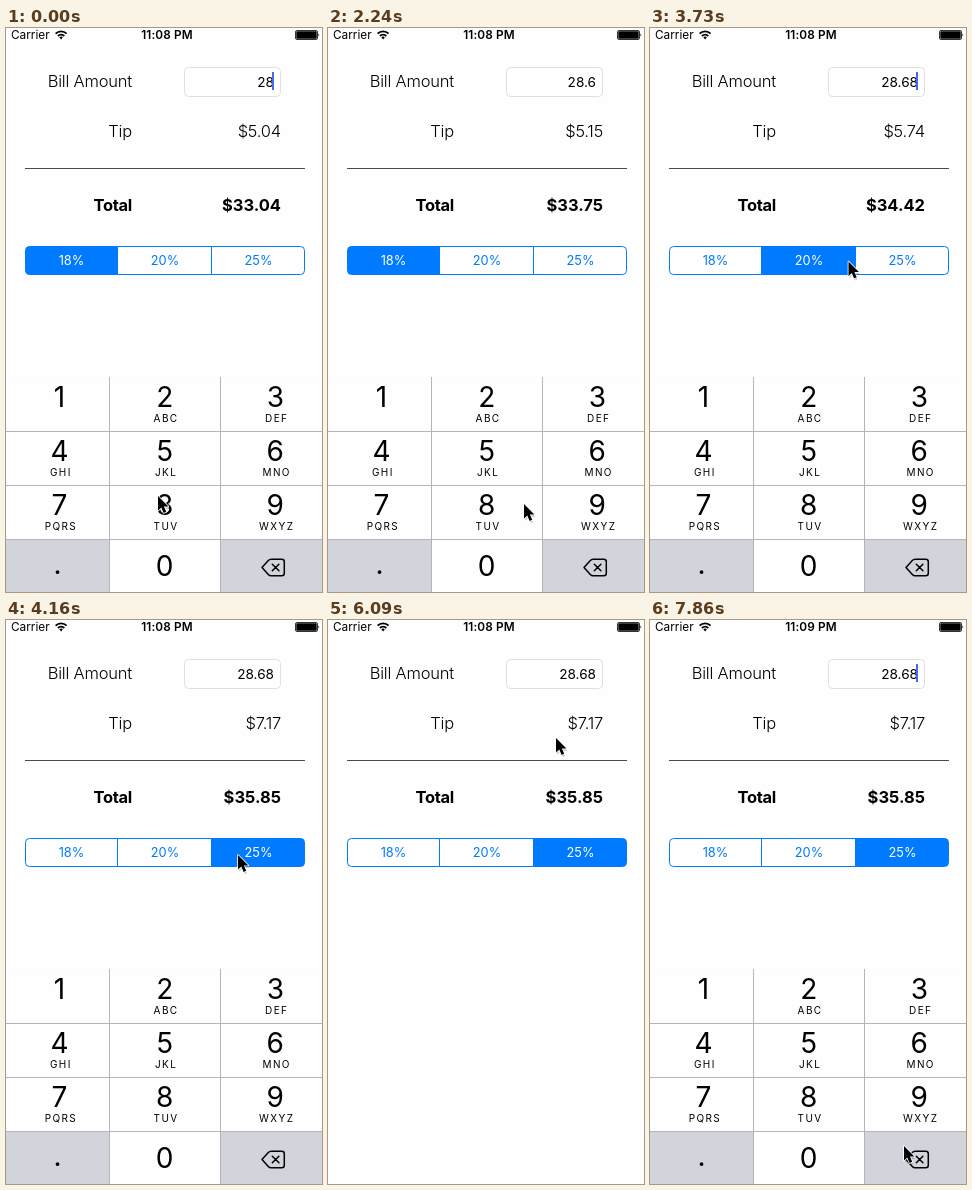
Recreate the animation shown at these times as an HTML page. Size 316x564 px, loop 8 s.

```html
<!DOCTYPE html>
<html lang="en">
<head>
<meta charset="utf-8">
<title>Tip calculator</title>
<style>
  html, body { margin: 0; width: 100%; height: 100%; overflow: hidden; background: #fefefe; }
  svg { display: block; width: 316px; height: 564px; font-family: Inter, Roboto, sans-serif; }
  .light { font-size: 16.5px; font-weight: 300; letter-spacing: -.2px; text-anchor: end; }
  .bold { font-size: 16.5px; font-weight: 700; text-anchor: end; }
  .digit { font-size: 28px; text-anchor: middle; }
  .letters { font-size: 10px; letter-spacing: 1.4px; text-anchor: middle; }
  .seg { font-size: 12.8px; text-anchor: middle; }
</style>
</head>
<body>
<svg id="stage" viewBox="0 0 316 564">
  <rect width="316" height="564" fill="#fefefe"/>

  <text x="5" y="11.3" font-size="11.8">Carrier</text>
  <g fill="none" stroke="#000" stroke-width="1.8">
    <path d="M49.6 5.6a7.8 7.8 0 0 1 11 0M51.9 8a4.6 4.6 0 0 1 6.4 0"/>
    <path d="M53.4 9.4a2.4 2.4 0 0 1 3.4 0L55.1 11.4Z" fill="#000" stroke="none"/>
  </g>
  <text id="clock" x="161" y="11.3" font-size="11.8" font-weight="600" letter-spacing=".15" text-anchor="middle"></text>
  <rect x="289.5" y="2.5" width="22" height="9" rx="1.5" fill="#fefefe" stroke="#000" stroke-width=".8"/>
  <rect x="290.3" y="3.2" width="20.4" height="7.6" rx=".8"/>
  <path d="M312.5 5.2q1.6 1.8 0 3.6Z"/>

  <text class="light" x="126" y="58.5">Bill Amount</text>
  <text class="light" x="126" y="108.5">Tip</text>
  <text class="bold" x="126" y="182.5" letter-spacing="-.3">Total</text>
  <rect x="178.5" y="39.5" width="96" height="29" rx="4" fill="#fff" stroke="#dfdfe1"/>
  <text id="bill" x="268" y="59" font-size="13.6" text-anchor="end"></text>
  <rect id="caret" x="266" y="44" width="2" height="18" fill="#426bf2"/>
  <text id="tip" class="light" x="275" y="108.5"></text>
  <text id="total" class="bold" x="275" y="183.2"></text>
  <path d="M19 140.5H299" stroke="#4c4c4c"/>

  <g id="segments"></g>
  <g id="keyboard"></g>

  <g id="pointer">
    <path d="M.6 1.6V16l3.3-3 2.3 5.3 2.5-1.1-2.2-5.1h4.6Z" fill="#000" opacity=".2" transform="translate(.4 .8)"/>
    <path d="M0 0V14.6L3.3 11.5 5.6 16.9 8.2 15.8 5.9 10.5H10.4Z" stroke="#fff" stroke-width="1.6" paint-order="stroke" stroke-linejoin="round"/>
  </g>
</svg>
<script>
const LOOP = 8000, STEPS = 54;
const BLUE = '#007aff', PAPER = '#fefefe', GREY = '#d1d4db', TINT = '#d4e8ff';
const $ = id => document.getElementById(id);

function add(parent, tag, attrs, text = '') {
  const el = document.createElementNS('http://www.w3.org/2000/svg', tag);
  for (const name in attrs) el.setAttribute(name, attrs[name]);
  el.textContent = text;
  return parent.appendChild(el);
}

// Segmented control
const rates = [18, 20, 25];
const segPaths = [
  'M111.5 218.5H23.5a4 4 0 0 0-4 4V242.5a4 4 0 0 0 4 4H111.5Z',
  'M111.5 218.5H205.5V246.5H111.5Z',
  'M205.5 218.5H294.5a4 4 0 0 1 4 4V242.5a4 4 0 0 1-4 4H205.5Z'
];
const segments = rates.map((rate, i) => ({
  box: add($('segments'), 'path', { d: segPaths[i], stroke: BLUE }),
  label: add($('segments'), 'text', { class: 'seg', x: 65.5 + 93.5 * i, y: 237.3 }, rate + '%')
}));

// Number pad
const colX = [0, 103.5, 214.5, 316], rowY = [348.5, 403.5, 457.5, 511.5, 564];
const midX = [53.5, 158.7, 269.3], baseY = [379, 433, 487, 548];
const faces = ['1', '2', '3', '4', '5', '6', '7', '8', '9', '.', '0', ''];
const letters = ['', 'ABC', 'DEF', 'GHI', 'JKL', 'MNO', 'PQRS', 'TUV', 'WXYZ'];
const pad = $('keyboard');
const keys = faces.map((face, i) => {
  const c = i % 3, r = Math.floor(i / 3);
  const box = add(pad, 'rect', {
    x: colX[c], y: rowY[r], width: colX[c + 1] - colX[c], height: rowY[r + 1] - rowY[r]
  });
  const dot = face === '.';
  add(pad, 'text', { class: 'digit', x: midX[c] - (dot ? 2 : 0), y: baseY[r] - (dot ? 2 : 0) }, face);
  if (letters[i]) add(pad, 'text', { class: 'letters', x: midX[c] + 1.4, y: baseY[r] + 15 }, letters[i]);
  return { face, box, rest: dot || !face ? GREY : PAPER, down: dot ? PAPER : GREY };
});
add(pad, 'path', {
  d: 'M103.5 349V564M214.5 349V564M0 403.5H316M0 457.5H316M0 511.5H316', stroke: '#b4b5b9', fill: 'none'
});
add(pad, 'path', {
  d: 'M256 539.5L262.3 532.6Q263.5 531.3 265.2 531.3H275.8Q278.3 531.3 278.3 533.8V545.2Q278.3 547.7 275.8 547.7H265.2Q263.5 547.7 262.3 546.4ZM266.3 536.2L272.9 542.8M272.9 536.2L266.3 542.8',
  fill: 'none', stroke: '#000', 'stroke-width': 1.5, 'stroke-linejoin': 'round', 'stroke-linecap': 'round'
});

// Timeline, counted in steps: [start, value...]
const path = [
  [0, 152, 468], [3, 52, 541], [5, 52, 541], [8, 248, 428], [9, 257, 427], [11, 257, 427],
  [15, 196, 476], [16, 186, 474], [18, 186, 474], [21, 201, 267], [23, 165, 232], [24, 165, 232],
  [26, 232, 235], [28, 232, 235], [31, 222, 290], [40, 222, 290], [41, 228, 118], [43, 238, 54],
  [48, 238, 54], [53, 254, 526]
];
const bills = [[0, '28'], [5, '28.'], [10, '28.6'], [17, '28.68']];
const choices = [[0, 0], [24, 1], [27, 2]];
const keyDown = { 4: '.', 9: '6', 16: '8' };
const segDown = { 23: 1, 26: 2 };
const blinkStarts = [[0], [5], [10], [17], [44]];
const HIDE = 34, SHOW = 44;

const latest = (list, n) => list.filter(item => item[0] <= n).pop();
const clamp = u => Math.min(1, Math.max(0, u));
const easeOut = u => 1 - (1 - clamp(u)) ** 3;

function pointerAt(n) {
  const a = latest(path, n), b = path[path.indexOf(a) + 1] || a;
  const u = (n - a[0]) / (b[0] - a[0] || 1), s = u * u * (3 - 2 * u);
  return [a[1] + (b[1] - a[1]) * s, a[2] + (b[2] - a[2]) * s];
}

function caretAt(n) {
  if (n >= HIDE && n < SHOW) return 0;
  const phase = (n - latest(blinkStarts, n)[0]) % 6.7;
  if (phase < 3.6) return 1;
  return phase < 4.1 ? .15 : phase < 6.2 ? 0 : .5;
}

function draw(time) {
  const n = Math.floor(time % LOOP / LOOP * STEPS);
  const bill = latest(bills, n)[1], choice = latest(choices, n)[1];
  const tip = bill * rates[choice] / 100;

  $('clock').textContent = n < 50 ? '11:08 PM' : '11:09 PM';
  $('bill').textContent = bill;
  $('tip').textContent = '$' + tip.toFixed(2);
  $('total').textContent = '$' + (+bill + tip).toFixed(2);
  $('caret').setAttribute('opacity', caretAt(n));

  segments.forEach(({ box, label }, i) => {
    box.setAttribute('fill', i === choice ? BLUE : i === segDown[n] ? TINT : PAPER);
    label.setAttribute('fill', i === choice ? '#fff' : BLUE);
  });
  keys.forEach(({ face, box, rest, down }) =>
    box.setAttribute('fill', face && face === keyDown[n] ? down : rest));

  const hidden = easeOut((n - HIDE + 1) / 5) - easeOut((n - SHOW + 1) / 5);
  pad.setAttribute('transform', `translate(0 ${217 * hidden})`);
  $('pointer').setAttribute('transform', `translate(${pointerAt(n)})`);
}

function tick() {
  draw(performance.now());
  requestAnimationFrame(tick);
}
tick();
</script>
</body>
</html>
```
